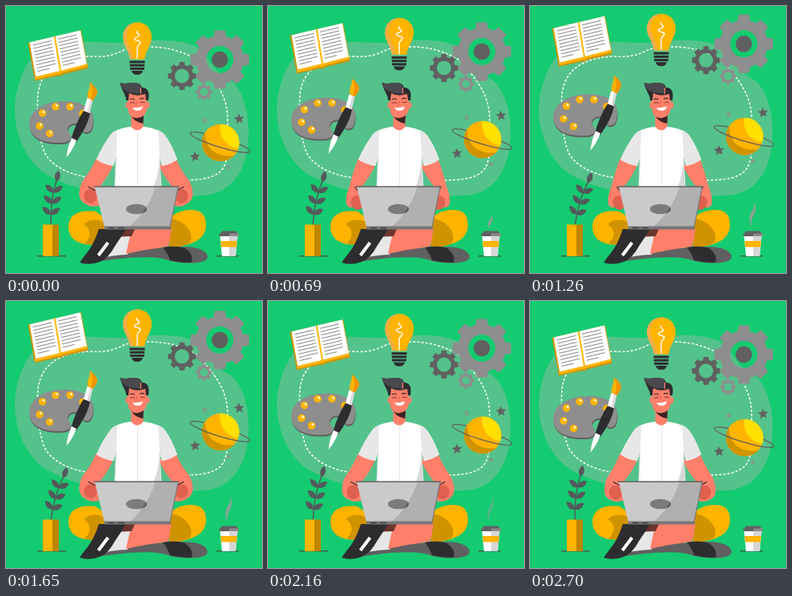
An HTML page with a canvas that plays this animation: 320 by 334 pixels, repeating every 2760 ms.

```html
<!DOCTYPE html>
<html lang="en">
<head>
<meta charset="utf-8">
<title>Creative work</title>
<style>
  html, body { margin: 0; width: 100%; height: 100%; overflow: hidden; background: #14cb71; }
  canvas { display: block; width: 320px; height: 334px; }
</style>
</head>
<body>
<canvas id="stage" width="320" height="334"></canvas>
<script>
const ctx = document.getElementById('stage').getContext('2d');
const LOOP = 2760;
const TAU = Math.PI * 2;
const C = {
  bg: '#14cb71', blob: '#54c28b', amber: '#ffb400', gold: '#d09300', yellow: '#ffe000',
  ink: '#2d2d30', leaf: '#54595a', steel: '#606060', gray: '#8e8e8e',
  skin: '#ff7f6a', skinShade: '#e0604f', white: '#ffffff', pale: '#e7e7e7'
};

const clamp = (v, lo = 0, hi = 1) => Math.min(hi, Math.max(lo, v));
const mix = (a, b, k) => a + (b - a) * k;
const wave = (t, period) => (1 - Math.cos(TAU * t / period)) / 2;

function shape(d, color) {
  ctx.fillStyle = color;
  ctx.fill(new Path2D(d));
}
function line(d, color, width = 1) {
  ctx.strokeStyle = color;
  ctx.lineWidth = width;
  ctx.stroke(new Path2D(d));
}
function oval(x, y, rx, ry, color, turn = 0) {
  ctx.beginPath();
  ctx.ellipse(x, y, rx, ry, turn, 0, TAU);
  ctx.fillStyle = color;
  ctx.fill();
}
function rect(x, y, w, h, color) {
  ctx.fillStyle = color;
  ctx.fillRect(x, y, w, h);
}
function shifted(x, y, draw) {
  ctx.save();
  ctx.translate(x, y);
  draw();
  ctx.restore();
}
function clipped(path, draw) {
  ctx.save();
  ctx.clip(path);
  draw();
  ctx.restore();
}

function backdrop() {
  rect(0, 0, 320, 334, C.bg);
  shape('M11 128C12 98 26 58 55 48C85 41 115 47 150 46C180 42 215 40 236 50C252 58 256 80 276 90C296 100 305 135 303 165C302 200 285 236 245 237C210 238 190 236 150 236C110 236 70 224 45 207C20 186 11 155 11 128Z', C.blob);
  ctx.setLineDash([3, 2.2]);
  line('M114 216C84 213 60 203 49 185C41 168 38 135 40 110C44 78 68 65 104 63C130 65 138 59 150 54C185 47 215 53 238 67C262 92 277 112 277 142C277 165 279 182 274 197C268 216 245 218 212 218', C.white, 1.5);
  ctx.setLineDash([]);
}

function book() {
  shape('M27.5 46L36 93.5L66 87L68 88L71 85.5L102.5 78L94 30.5Z', C.gold);
  shape('M36 89L36.6 92L66 85L68 86L70 83.500L102 75.500L101.5 72Z'.replace('83.500', '83.5').replace('75.500', '75.5'), C.amber);
  shape('M29.5 45.5L61 38L68 81L37 88.5Z', C.white);
  shape('M61 38L93 30.5L101 72.5L68 81Z', C.white);
  line('M60.8 38L68 81.5', C.amber, 2);
  for (let page = 0; page < 2; page++) {
    for (let row = 0; row < 9; row++) {
      const x = 33.5 + page * 31.5 + row * 0.75;
      const y = 49 - page * 7.5 + row * 4.1;
      line(`M${x} ${y}l${row === 8 ? 15 : 23.5} ${row === 8 ? -3.6 : -5.6}`, '#858585', 1);
    }
  }
}

function bulb() {
  const glass = 'M164 20.5C174.5 20.5 182 28.5 182 39C182 49 175 54 173 66.5L155 66.5C153 54 146 49 146 39C146 28.5 153.5 20.5 164 20.5Z';
  shape(glass, '#f3ad45');
  clipped(new Path2D(glass), () => shape('M166 19C154 23 150 32 151 41C153 51 159 55 160 68H184V19Z', C.amber));
  line('M164 66V52C164 49 168 48 168 45.5C168 43 160 43.5 160.5 41C161 38.5 167 39 166.5 36.5C166 34.5 163 35 163.5 31', C.white, 1.4);
  for (let i = 0; i < 3; i++) rect(154.5 + i * 0.3, 68.5 + i * 4.2, 19 - i * 0.6, 3, C.ink);
  shape('M157 81H171Q170 86 164 86Q158 86 157 81Z', C.ink);
}

function gear(x, y, outer, body, hole, color) {
  const path = new Path2D();
  const half = outer * 0.18;
  ctx.save();
  ctx.translate(x, y);
  ctx.fillStyle = color;
  path.arc(0, 0, body, 0, TAU);
  path.moveTo(hole, 0);
  path.arc(0, 0, hole, 0, TAU);
  ctx.fill(path, 'evenodd');
  for (let i = 0; i < 8; i++) {
    ctx.beginPath();
    ctx.moveTo(-half * 1.2, -body + 1.5);
    ctx.lineTo(-half, -outer);
    ctx.lineTo(half, -outer);
    ctx.lineTo(half * 1.2, -body + 1.5);
    ctx.fill();
    ctx.rotate(TAU / 8);
  }
  ctx.restore();
}
function gears() {
  gear(267.3, 67, 36.5, 30, 17, C.gray);
  oval(267.3, 67, 10.3, 10.3, C.steel);
  gear(220, 87.5, 17.5, 14, 9, C.steel);
  gear(247.5, 107.5, 10, 8, 5, C.gray);
}

function palette() {
  const board = 'M29 149C28 131 48 119 73 119C92 119 109 126 109 141C109 153 106 159 99 158C93 157 95 148 87 147C78 147 74 155 80 160C84 167 78 171 69 171C47 172 30 165 29 149Z';
  shifted(0.5, 2, () => shape(board, C.steel));
  shape(board, C.gray);
  [[45.5, 134], [62, 126], [80, 126], [96, 134.5], [42, 150], [54.5, 159.5]].forEach(([x, y]) => {
    oval(x, y, 4.7, 4.7, C.amber);
    oval(x + 1.5, y - 1.5, 1.7, 1.7, '#fff2b8');
  });
  shape('M97 131L105 133.5Q103 149 87 171L81 168Q87 146 97 131Z', C.ink);
  shape('M82 165L88 168Q83 181 75.5 189.5Q77 176 82 165Z', C.white);
  shape('M101.5 115L108.5 117L104.5 134L97 131Z', C.white);
  shape('M105.5 116L108.5 117L104.5 134L101.5 132.5Z', '#dadada');
  shape('M102 115C101 106 106 104 104.5 95.5C111 100 116 106 113 111Q111 115 108.5 118Z', C.amber);
  shape('M104.5 95.5C111 100 116 106 113 111Q111 115 108.5 118L105.5 116C109 108 110 104 104.5 95.5Z', '#f29400');
}

function star(x, y, r, color) {
  ctx.beginPath();
  for (let i = 0; i < 10; i++) {
    const radius = i % 2 ? r * 0.45 : r;
    const a = i * TAU / 10 - Math.PI / 2 - 0.1;
    ctx.lineTo(x + radius * Math.cos(a), y + radius * Math.sin(a));
  }
  ctx.fillStyle = color;
  ctx.fill();
}
function ring(from, to) {
  ctx.strokeStyle = C.steel;
  ctx.lineWidth = 1.3;
  ctx.beginPath();
  ctx.ellipse(267.5, 170.5, 39, 6, 0.3, from, to);
  ctx.stroke();
}
function planet() {
  const disc = new Path2D();
  disc.arc(268.3, 171, 23.3, 0, TAU);
  ring(Math.PI, TAU);
  ctx.fillStyle = C.amber;
  ctx.fill(disc);
  clipped(disc, () => {
    shape('M268 145H295V180Q276 177 270 164Q266 155 268 145Z', C.yellow);
    shape('M243 160L249 160C250 181 266 190 286 187L286 198H240Z', C.gold);
  });
  ring(0, Math.PI);
  star(248.5, 143.5, 4.5, '#7e9b8c');
  star(291.3, 141.3, 6.8, C.steel);
  star(236.3, 188.5, 6.8, C.steel);
  star(278.5, 202, 3.8, '#7e9b8c');
}

function leaf(x, y, turn) {
  ctx.save();
  ctx.translate(x, y);
  ctx.rotate(turn);
  shape('M0 0C-5 -4 -4 -10 0 -14C4 -10 5 -4 0 0Z', C.leaf);
  ctx.restore();
}
function plant(sway) {
  ctx.save();
  ctx.translate(56.5, 274);
  ctx.rotate(mix(7.5, 17.5, sway) * Math.PI / 180);
  line('M0 2Q-6 -32 0 -60', C.leaf, 1.5);
  [13, 27, 41].forEach(h => {
    leaf(-2.5, -h, -0.95);
    leaf(-2.5, -h, 0.85);
  });
  leaf(-0.5, -55, 0.05);
  ctx.restore();
  rect(39, 312, 36, 1.5, '#3c604a');
  rect(46, 273.5, 12, 39.5, C.amber);
  rect(58, 273.5, 8, 39.5, '#bd8500');
}

function steam(t) {
  const grow = wave(Math.min(t, 1300), 2600);
  const fade = 1 - clamp((t - 1650) / 1000);
  ctx.save();
  ctx.globalAlpha = fade * 0.9;
  ctx.translate(277.5, 281);
  ctx.scale(mix(0.5, 1, grow), grow);
  shape('M-1 -4C-5 -14 -3 -21 1 -26Q3 -30 3 -37C6 -28 4 -22 1 -17Q-2 -11 -1 -4Z', '#9a9f9c');
  ctx.restore();
}
function cup() {
  rect(263, 312, 28, 1.5, '#3c604a');
  shape('M267.5 287.5H289.5L287 313H270Z', C.white);
  shape('M279 287.5H289.5L287 313H279Z', '#d6d6d6');
  shape('M268.2 294H288.9L288.1 301.5H269Z', C.amber);
  shape('M269.5 281.5H288L289 284.5H291V288H266.5V284.5H268.5Z', C.steel);
  rect(279, 284.5, 12, 3.5, '#8a8a8a');
}

function legs() {
  shape('M95 323C135 306 170 303 210 302C238 299 252 306 252 314C251 323 225 323 205 319C185 311 150 314 95 323Z', C.steel);
  shape('M78 276C79 260 92 255 112 257L132 271L126 294C112 300 98 299 92 296C84 293 78 287 78 276Z', C.amber);
  shape('M97 273C106 265 118 267 125 272V294C114 300 103 299 98 297C107 290 107 279 97 273Z', C.gold);
  shape('M204 265C214 256 228 253 239 256C248 259 250 266 250 275C249 291 235 300 204 302Z', C.amber);
  shape('M204 266C216 266 228 275 231 285Q233 292 229 297Q218 302 204 302Z', C.gold);
  shape('M136 284L160 286L152 311Q142 311 124 314Z', C.pale);
  shape('M157 279H207L203 301Q176 304 150 310Z', C.skin);
  shape('M138 279H161L157 288L132 289Z', '#6c352d');
  shape('M196 302Q213 299 224 303Q235 311 232 321Q216 321 205 318Q202 309 196 302Z', C.ink);
  shape('M116 279H150Q144 289 137 299Q128 316 117 320Q105 325 92 321Q96 315 101 309Q110 298 116 279Z', C.ink);
  line('M127.500 296L115.500 312'.replaceAll('.500', '.5'), C.white, 4);
}

// pull: 0 with elbows wide, 1 with elbows drawn in.
function arm(pull) {
  const x = mix(91.5, 97.5, pull);
  const y = mix(235, 243, pull);
  shape(`M113 190L134 199Q128 213 118 225L122 249L108 251Q${x} ${y + 12} ${x} ${y}Q${x} ${y - 7} ${x + 4} ${y - 16}Q107 205 113 190Z`, C.skin);
  oval(x + 14, y + 3, 8, 9, C.skinShade, -0.3);
  line(`M${x + 11} 226L112 231`, C.ink, 1.2);
}
function arms(pull) {
  arm(pull);
  ctx.save();
  ctx.translate(325, 0);
  ctx.scale(-1, 1);
  arm(pull);
  ctx.restore();
}

function torso() {
  shape('M155 151C144 153 135 155 130 162Q120 176 113 192Q122 198 134 200L138 188L135 235H195L192 188L195 200Q206 198 214 192Q207 173 199 162C193 155 184 153 173 151Z', C.white);
  shape('M139 155Q134 157 130 162Q120 176 113 192Q122 198 134 200L138 185Z', C.pale);
  shape('M190 155Q195 157 199 162Q207 173 214 192Q206 198 195 200L192 188Z', C.pale);
  shape('M192 186L194 228H184Q192 208 192 186Z', '#d8d8d8');
  line('M137 178V226M164.5 157V226', '#e6e6e6', 1);
  shape('M156.500 137H171.500V151Q164 160 156.500 151Z'.replaceAll('.500', '.5'), C.skin);
}

function head() {
  oval(151.5, 124, 2, 4, C.skin);
  oval(177, 124, 2.5, 4, C.skin);
  shape('M152 108H176V129Q174 138 167 141Q157 142 153 133Z', C.skin);
  shape('M157 138Q164 143 172 137L171.5 147Q162 146 157 138Z', '#3b2523');
  shape('M150 118C151 113 145 107 142.5 96C151 99 158 94 168 98L170 102C177 102 180 107 178 118H175L174 110Q162 114 154 109L153 118Z', C.ink);
  shape('M142.5 96C151 99 158 94 168 98L168 109Q152 111 144 101Z', '#4a4a4e');
  line('M168.5 102V110', C.skin, 1.2);
  line('M155 117Q157 115 161 117M167 116.5Q170 114.5 173 116', C.ink, 1.2);
  line('M155 121.5Q158 119.5 161 121.5M168 121Q171 119 173.5 121', '#7b332c', 1);
  line('M164 119L162.5 125', C.skinShade, 1);
  shape('M158 127Q165 128 171 125.5Q170 131 164.5 131Q160 131 158 127Z', C.white);
}

function laptop() {
  const lid = new Path2D('M111 226H215L205 277H123Z');
  const shade = new Path2D('M187 225H217V279H151Q178 257 187 225Z');
  ctx.fillStyle = '#cacaca';
  ctx.fill(lid);
  clipped(lid, () => {
    ctx.fillStyle = '#b0b0b0';
    ctx.fill(shade);
    oval(163, 254, 13, 6.3, '#7b7b7b');
    clipped(shade, () => oval(163, 254, 13, 6.3, '#5b5b63'));
  });
  line('M110 226H216', C.steel, 1.4);
  line('M215 227L205 277', '#777', 1.2);
  rect(123, 275.5, 83, 4, '#777');
  rect(128, 277, 8, 1, C.ink);
  rect(140, 277, 8, 1, C.ink);
}

function draw(t) {
  const drift = wave(t, LOOP);
  const pull = clamp(wave(t, LOOP / 5) * 2);
  backdrop();
  shifted(0, -18 * drift, book);
  shifted(0, -11 * drift, bulb);
  shifted(0, -20 * drift, gears);
  shifted(0, -9 * drift, palette);
  shifted(0, -8 * drift, planet);
  plant(drift);
  steam(t);
  cup();
  legs();
  arms(pull);
  torso();
  head();
  laptop();
}

function frame() {
  draw(performance.now() % LOOP);
  requestAnimationFrame(frame);
}
frame();
</script>
</body>
</html>
```
